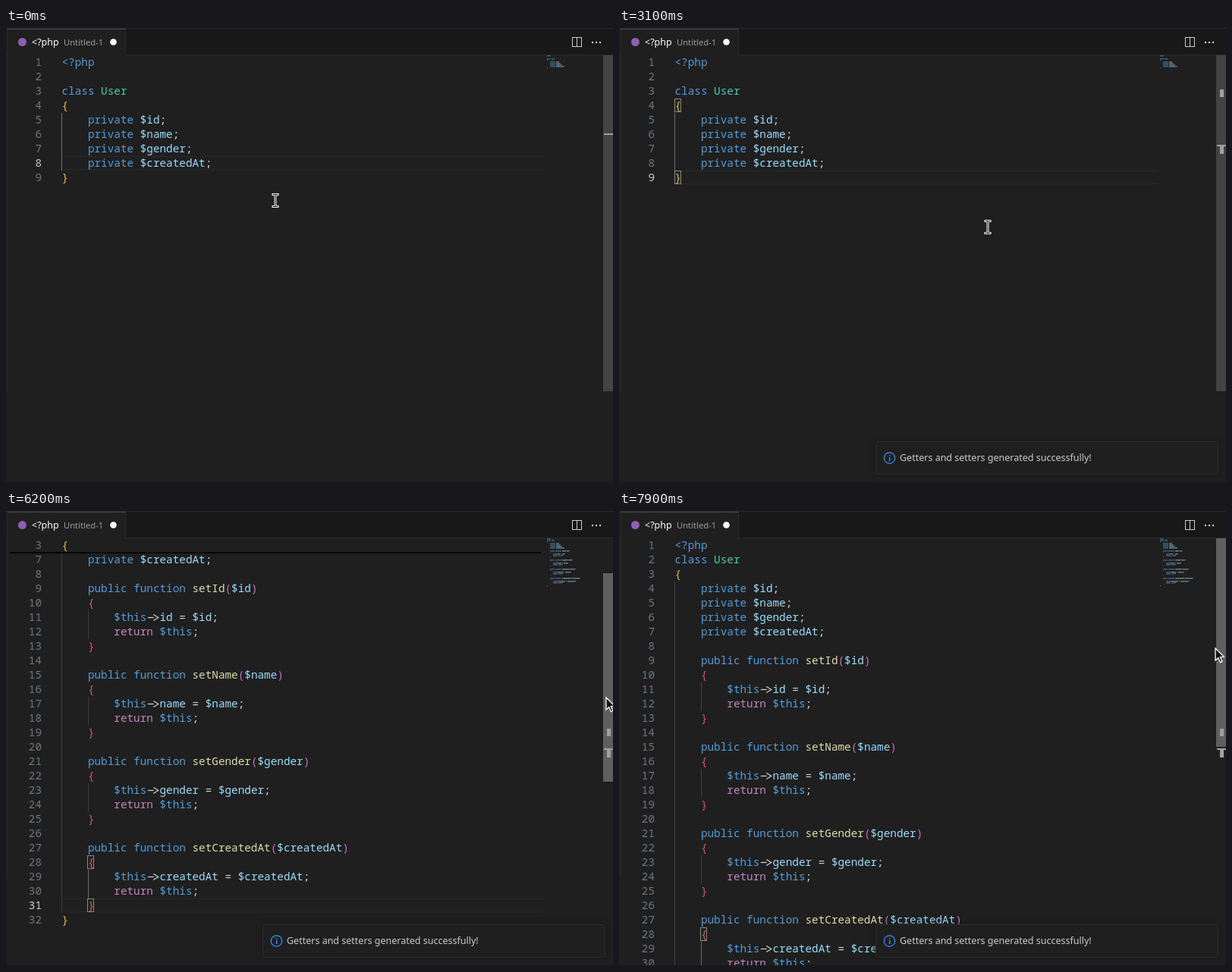
An HTML page with a canvas for the animation above (8 s loop, 800x600 px).

```html
<!DOCTYPE html>
<html lang="en">
<head>
<meta charset="utf-8">
<title>Editor</title>
<style>
html, body { margin: 0; width: 100%; height: 100%; overflow: hidden; background: #1f1f1f; }
canvas { display: block; }
</style>
</head>
<body>
<canvas id="stage" width="800" height="600"></canvas>
<script>
const ctx = document.getElementById('stage').getContext('2d');
const LOOP = 8000, STEP = 100;
const TOP = 36, ROW = 19, VIEW = 563, LEFT = 73.5, CHAR = 8.6;
const BG = '#1f1f1f', BLUE = '#569cd6';
const MONO = '14.33px "Noto Sans Mono", "DejaVu Sans Mono", monospace';
const ui = size => `${size}px "Noto Sans", "Open Sans", sans-serif`;

// Document contents
const fields = ['id', 'name', 'gender', 'createdAt'];
const props = fields.map(f => `    private $${f};`);
const cap = s => s[0].toUpperCase() + s.slice(1);
const getter = f => [`    public function get${cap(f)}()`, '    {',
  `        return $this->${f};`, '    }'];
const setter = f => [`    public function set${cap(f)}($${f})`, '    {',
  `        $this->${f} = $${f};`, '        return $this;', '    }'];
const withMethods = make => ['<?php', 'class User', '{', ...props,
  ...fields.flatMap(f => ['', ...make(f)]), '}'];

function tokenize(line) {
  const out = [], re = /<\?php|->|\$?\w+|\S/g;
  let m, prev = '';
  while ((m = re.exec(line))) {
    const s = m[0];
    let color = '#d4d4d4';
    if (/^(<\?php|class|private|public|function|\$this)$/.test(s)) color = BLUE;
    else if (s === 'return') color = '#c586c0';
    else if (prev === 'class') color = '#4ec9b0';
    else if (/[{}]/.test(s)) color = m.index ? '#d9566f' : '#e8b95c';
    else if (/[()]/.test(s)) color = '#c76fc8';
    else if (s[0] === '$' || prev === '->') color = '#9cdcfe';
    else if (line[re.lastIndex] === '(') color = '#dcdcaa';
    out.push({ s, col: m.index, color });
    prev = s;
  }
  return out;
}
const makeDoc = lines => ({
  lines, tokens: lines.map(tokenize), height: VIEW + (lines.length - 1) * ROW
});
const plain = makeDoc(['<?php', '', 'class User', '{', ...props, '}']);
const getters = makeDoc(withMethods(getter));
const setters = makeDoc(withMethods(setter));

// Motion: [time, x, y] for the pointer, [time, offset] for the scroll
const pointerKeys = [
  [0, 355, 227], [600, 355, 227], [800, 372, 250], [1000, 422, 290], [1100, 440, 303],
  [1400, 440, 303], [1900, 524, 294], [2900, 524, 294], [3600, 390, 182], [3700, 385, 178],
  [3800, 412, 194], [3900, 453, 239], [4000, 458, 260], [4200, 462, 280], [4600, 462, 280],
  [5400, 778, 203], [5700, 791, 199], [5800, 791, 199], [6000, 791, 216], [6200, 791, 246],
  [6400, 791, 275], [6600, 791, 292], [6800, 791, 294], [7000, 791, 294], [7200, 791, 280],
  [7400, 790, 257], [7600, 789, 233], [7900, 786, 181], [8000, 786, 181]
];
const scrollKeys = [
  [0, 0], [5800, 0], [6000, 35], [6200, 95], [6400, 155], [6600, 190], [6800, 194],
  [7000, 194], [7200, 172], [7400, 130], [7600, 84], [7800, 14], [7900, 0], [8000, 0]
];
function track(keys, t, i) {
  const n = keys.findIndex(k => k[0] > t);
  const a = keys[n - 1], b = keys[n];
  return a[i] + (b[i] - a[i]) * (t - a[0]) / (b[0] - a[0]);
}

function sceneAt(t) {
  if (t < 1500) return t < 400 ? { doc: plain, cur: 8, match: [] } : { doc: plain, cur: 9, match: [4, 9] };
  if (t < 3000) return { doc: getters, cur: 28, match: [3, 28], caret: t < 2000 || t >= 2500 };
  if (t < 4600) return { doc: plain, cur: t < 3700 ? 9 : 8, match: [4, 9] };
  return { doc: setters, cur: 31, match: [28, 31], caret: Math.floor((t - 600) / 500) % 2 === 0 };
}

// Drawing helpers
function box(x, y, w, h, color) {
  ctx.fillStyle = color;
  ctx.fillRect(x, y, w, h);
}
function frame(x, y, w, h, color) {
  ctx.strokeStyle = color;
  ctx.lineWidth = 1;
  ctx.strokeRect(x + .5, y + .5, w - 1, h - 1);
}
function text(s, x, y, color, font, align = 'left') {
  ctx.font = font;
  ctx.fillStyle = color;
  ctx.textAlign = align;
  ctx.fillText(s, x, y);
}
function dot(x, y, r, color) {
  ctx.fillStyle = color;
  ctx.beginPath();
  ctx.arc(x, y, r, 0, 7);
  ctx.fill();
}
function line(points, color, width) {
  ctx.strokeStyle = color;
  ctx.lineWidth = width;
  ctx.beginPath();
  points.forEach(([x, y]) => ctx.lineTo(x, y));
  ctx.stroke();
}
function panel(x, y, w, h, r, border) {
  ctx.save();
  ctx.shadowColor = 'rgba(0,0,0,.36)';
  ctx.shadowBlur = 8;
  ctx.fillStyle = BG;
  ctx.beginPath();
  ctx.roundRect(x + .5, y + .5, w - 1, h - 1, r);
  ctx.fill();
  ctx.restore();
  ctx.strokeStyle = border;
  ctx.lineWidth = 1;
  ctx.stroke();
}

function drawRow(doc, n, y, active) {
  text(n, 47, y + 14, active ? '#cccccc' : '#6e7681', MONO, 'right');
  for (const { s, col, color } of doc.tokens[n - 1]) {
    const x = LEFT + col * CHAR;
    if (s === '->') {
      const mid = y + 9.5;
      line([[x + 1.5, mid], [x + 9.5, mid]], color, 1.2);
      line([[x + 9, mid - 4], [x + 15.5, mid], [x + 9, mid + 4]], color, 1.2);
    } else text(s, x, y + 14, color, MONO);
  }
}

function drawGuides(doc, scene, rowY) {
  const first = doc.lines.indexOf('{') + 2;
  const inner = doc === setters;
  for (let n = first; n < doc.lines.length; n++) {
    const y = rowY(n);
    box(73, y, 1, ROW, inner ? '#404040' : '#707070');
    if (doc.lines[n - 1].startsWith('        '))
      box(108, y, 1, ROW, inner && n > scene.match[0] ? '#707070' : '#404040');
  }
}

function drawSticky(scroll) {
  if (scroll <= 38) return;
  const second = scroll > 152;
  const push = Math.min(0, 12 * ROW - scroll - 2 * ROW);
  const bottom = TOP + (second ? 2 * ROW + push : ROW);
  box(2, TOP, 704, bottom - TOP, BG);
  if (second) drawRow(setters, 10, TOP + ROW + push);
  box(2, TOP, 704, ROW, BG);
  drawRow(setters, 3, TOP);
  box(5, bottom - 1, 700, 2, '#050505');
}

function drawEditor(scene, scroll) {
  const { doc, cur, match } = scene;
  const rowY = n => TOP + (n - 1) * ROW - scroll;
  box(73, rowY(cur), 635, 1, '#2a2a2a');
  box(73, rowY(cur) + ROW - 2, 635, 1, '#2a2a2a');
  drawGuides(doc, scene, rowY);
  for (const n of match) {
    const x = Math.floor(LEFT + doc.lines[n - 1].search(/\S/) * CHAR - .4);
    box(x, rowY(n), 9, 18, '#1c261c');
    frame(x, rowY(n), 9, 18, '#888888');
  }
  doc.lines.forEach((_, i) => drawRow(doc, i + 1, rowY(i + 1), i + 1 === cur));
  if (scene.caret)
    box(Math.round(LEFT + doc.lines[cur - 1].length * CHAR - 1), rowY(cur), 2, 18, '#d8d8d8');
  drawSticky(scroll);
}

function drawMinimap(doc, hover) {
  if (hover) box(705, TOP, 82, 59, '#323232');
  ctx.globalAlpha = .5;
  doc.tokens.forEach((row, i) => row.forEach(({ s, col, color }) => {
    box(713 + col, TOP + i * 2, s.length, /\w/.test(s) ? 1.5 : 1, color);
  }));
  ctx.globalAlpha = 1;
}

function drawScrollbar({ doc, cur, match }, scroll, color) {
  const k = VIEW / doc.height;
  const mark = n => Math.round(TOP + (n - 1) * ROW * k);
  box(787, Math.round(TOP + scroll * k), 13, Math.round(VIEW * k), color);
  if (match.includes(cur)) match.forEach(n => box(792, mark(n), 5, 10, '#a0a0a0'));
  box(788, mark(cur) - 2, 12, 2, '#a0a0a0');
}

function drawTabs() {
  box(0, 0, 800, TOP, '#181818');
  box(0, 35, 800, 1, '#2b2b2b');
  box(0, 0, 800, 1, '#2b2b2b');
  box(1, 1, 156, 35, BG);
  box(1, 1, 156, 1, '#484848');
  box(157, 1, 1, 35, '#2b2b2b');
  box(1, 1, 1, 479, '#2b2b2b');
  dot(21.5, 18.5, 5.5, '#8d5fb0');
  text('<?php', 34, 23, '#ffffff', ui(12.5));
  text('Untitled-1', 76, 23, '#9d9d9d', ui(11.2));
  dot(141.5, 18.5, 4.3, '#ffffff');
  frame(746, 12, 13, 13, '#cccccc');
  box(752, 12, 1, 13, '#cccccc');
  for (let i = 0; i < 3; i++) dot(773 + i * 5, 19, 1.2, '#cccccc');
  box(0, 599, 800, 1, '#181818');
}

function drawToast(dy) {
  const y = 545 + dy;
  panel(338, y, 452, 44, 3, '#2d2d2d');
  ctx.strokeStyle = '#3794ff';
  ctx.lineWidth = 1.2;
  ctx.beginPath();
  ctx.arc(356.5, y + 22, 7.2, 0, 7);
  ctx.stroke();
  box(356, y + 18, 1.4, 1.6, '#3794ff');
  box(356, y + 21, 1.4, 5, '#3794ff');
  text('Getters and setters generated successfully!', 370, y + 26, '#cccccc', ui(12.5));
}

const menuItems = [
  [17, 'Change All Occurrences', 'Ctrl+F2'], [43, 'Refactor...', 'Ctrl+Shift+R'],
  [80, 'Generate Getters', ''], [106, 'Generate Setters', ''],
  [132, 'Generate Getters and Setters', ''],
  [169, 'Cut', 'Ctrl+X'], [195, 'Copy', 'Ctrl+C'], [221, 'Paste', 'Ctrl+V'],
  [258, 'Command Palette...', 'Ctrl+Shift+P']
];
function drawMenu(x, y, px, py) {
  panel(x, y, 295, 276, 5, '#454545');
  for (const sep of [61, 150, 239]) box(x + 1, y + sep, 293, 1, '#454545');
  for (const [dy, label, keys] of menuItems) {
    const over = px > x + 4 && Math.abs(py - y - dy - .5) < 13;
    if (over) {
      ctx.fillStyle = '#0078d4';
      ctx.beginPath();
      ctx.roundRect(x + 5, y + dy - 12, 285, 26, 4);
      ctx.fill();
    }
    const color = over ? '#ffffff' : '#cccccc';
    text(label, x + 31, y + dy + 5, color, ui(12.5));
    text(keys, x + 265, y + dy + 5, color, ui(12.5), 'right');
  }
}

function drawArrow(x, y) {
  ctx.beginPath();
  [[0, 0], [0, 16], [3.7, 12.6], [6.4, 18.6], [9, 17.4], [6.4, 11.6], [11.3, 11.3]]
    .forEach(([dx, dy]) => ctx.lineTo(x + dx, y + dy));
  ctx.closePath();
  ctx.fillStyle = '#111111';
  ctx.fill();
  ctx.strokeStyle = '#ffffff';
  ctx.lineWidth = 1.3;
  ctx.stroke();
}
function drawBeam(x, y) {
  for (const [color, g] of [['#ffffff', 1], ['#111111', 0]]) {
    box(x - .5 - g, y - 8 - g, 1 + 2 * g, 17 + 2 * g, color);
    for (const dy of [-8, 8]) box(x - 3.5 - g, y + dy - g, 7 + 2 * g, 1 + 2 * g, color);
  }
}

function render(t) {
  const scene = sceneAt(t);
  const scroll = Math.round(track(scrollKeys, t, 1));
  const px = Math.round(track(pointerKeys, t, 1));
  const py = Math.round(track(pointerKeys, t, 2));
  const menu = t >= 400 && t < 1500 ? [355, 227] : t >= 3700 && t < 4600 ? [384, 177] : null;
  const overMap = t >= 4600 && px > 705 && px < 787 && t < 5800;

  box(0, 0, 800, 600, BG);
  drawEditor(scene, scroll);
  drawMinimap(scene.doc, overMap);
  drawScrollbar(scene, scroll, t >= 5900 ? '#5f5f5f' : t >= 4600 && px >= 787 ? '#4f4f4f' : '#434343');
  drawTabs();
  if (t >= 1700) drawToast(Math.max(0, (1900 - t) / 10));
  if (menu) drawMenu(...menu, px, py);
  if (t >= 2500 && t < 3000) return;
  if (menu || px > 705) drawArrow(px, py);
  else drawBeam(px, py);
}

const start = performance.now();
function tick() {
  const t = (performance.now() - start) % LOOP;
  render(Math.floor(t / STEP) * STEP);
  requestAnimationFrame(tick);
}
tick();
</script>
</body>
</html>
```
